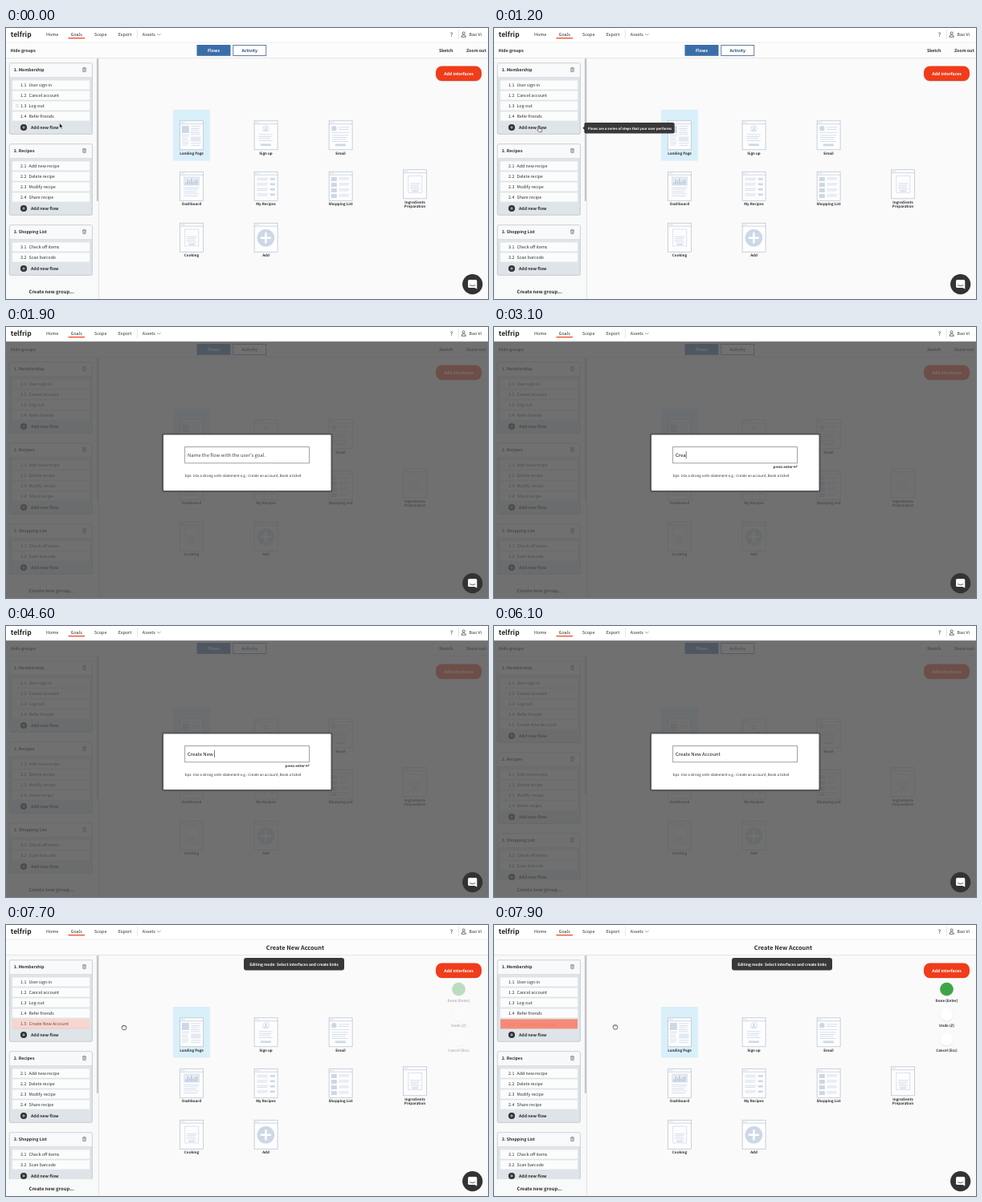
Write an HTML page that moves like this. It is 600 px wide and 338 px high and loops after 8000 ms.

```html
<!DOCTYPE html>
<html lang="en">
<head>
<meta charset="utf-8">
<title>Flow editor</title>
<style>
html, body { margin: 0; width: 100%; height: 100%; overflow: hidden; background: #fafafa; }
svg { display: block; width: 100vw; height: 100vh; }
text {
  font-family: "Noto Sans CJK JP", "Noto Sans CJK SC", "Noto Sans CJK", "Open Sans", sans-serif;
  white-space: pre; text-rendering: geometricPrecision;
}
</style>
</head>
<body>
<svg id="stage" viewBox="0 0 600 338"></svg>
<script>
const INK = '#2b2b2b', DARK = '#383838', RED = '#f03c1a', BLUE = '#cdd8e6';
const FONT_SCALE = .9; // the font's Latin letters are large for their nominal size

// Markup helpers
const rect = (x, y, w, h, fill, more = '') =>
  `<rect x="${x}" y="${y}" width="${w}" height="${h}" fill="${fill}" ${more}/>`;
const circle = (x, y, r, fill, more = '') =>
  `<circle cx="${x}" cy="${y}" r="${r}" fill="${fill}" ${more}/>`;
const path = (d, stroke, width = .7, fill = 'none') =>
  `<path d="${d}" fill="${fill}" stroke="${stroke}" stroke-width="${width}"/>`;
const text = (s, x, y, { size = 6, bold = 0, fill = INK, mid = 0, id = '' } = {}) =>
  `<text ${id && `id="${id}"`} x="${x}" y="${y}" fill="${fill}" text-anchor="${mid ? 'middle' : 'start'}"
    style="font-size:${size * FONT_SCALE}px;font-weight:${bold ? 600 : 400}">${s}</text>`;
const group = (id, ...parts) => `<g id="${id}">${parts.join('')}</g>`;
const at = (x, y, body) => `<g transform="translate(${x} ${y})">${body}</g>`;
const lines = (x, y, w, n, step = 2.5) =>
  Array.from({ length: n }, (_, i) => rect(x, y + i * step, w - (i % 3) * w * .08, .8, BLUE)).join('');

const trash = at(97.5, 0, path('M-2.4 -1.8H2.4M-.8 -1.8V-2.6H.8V-1.8M-1.8 -1.8L-1.6 2.6H1.6L1.8 -1.8M-.6 -.6V1.6M.6 -.6V1.6', '#555', .55));

function card(y, no, title, items) {
  const h = 36.5 + 13 * items.length, add = 28 + 13 * items.length;
  const rows = items.map((s, i) => {
    const c = 27.5 + 13 * i;
    return rect(8, c - 5.6, 96, 11.2, '#fbfcfc') +
      text(`${no}.${i + 1}`, 18, c + 2.1, { size: 5.9 }) + text(s, 28.5, c + 2.1, { size: 5.9 });
  }).join('');
  return at(0, y,
    rect(4.3, .3, 103, h, '#dfe4e8', 'rx="1.5" stroke="#b4bcc4" stroke-width=".7"') +
    rect(4.7, .7, 102.2, 17.3, '#f8f9fa', 'rx="1.2"') + rect(4.6, 17.8, 102.4, .5, '#ccd2d8') +
    text(`${no}. ${title}`, 9.7, 10.6, { size: 5.8, bold: 1 }) + at(0, 8.5, trash) + rows +
    circle(22, add + .5, 4.1, '#333') +
    path(`M20.2 ${add + .5}H23.8M22 ${add - 1.3}V${add + 2.3}`, '#dfe4e8', .7) +
    text('Add new flow', 31, add + 2.6, { size: 5.8, bold: 1 }));
}

function sidebar(id, extra) {
  const first = ['User sign in', 'Cancel account', 'Log-out', 'Refer friends', ...extra];
  const shift = 13 * extra.length;
  return group(id,
    card(43.5, 1, 'Membership', first),
    card(144.5 + shift, 2, 'Recipes', ['Add new recipe', 'Delete recipe', 'Modify recipe', 'Share recipe']),
    card(245.5 + shift, 3, 'Shopping List', ['Check off items', 'Scan barcode']),
    rect(112.8, 38, 2.2, extra.length ? 172 : 178, '#c3c6c9', 'rx="1"'));
}

// Thumbnail contents, in a 29 by 36 frame
const sheet = rect(6.5, 8, 17, 21, 'none', `stroke="${BLUE}" stroke-width=".7"`) +
  lines(9, 17, 12, 4, 2.2) + rect(11, 26, 8, 1.6, BLUE);
const art = {
  landing: rect(2.5, 6.5, 9, 9, BLUE) + lines(2.5, 17.5, 9, 6) + lines(14, 7, 12, 5) +
    rect(14, 20, 12, 6, '#e2e9f1') + lines(14, 28, 12, 2),
  signup: circle(14.7, 10, 3.8, '#fff', `stroke="${BLUE}" stroke-width=".8"`) + circle(14.7, 9.2, 1.4, BLUE) +
    rect(12.5, 11, 4.4, 1.6, BLUE) + lines(6, 17, 17, 4) + rect(8, 29, 13, 2.5, BLUE),
  email: circle(6.5, 9.8, 3.2, BLUE) + lines(12, 8, 14, 2) + path('M3 15H26', BLUE) +
    lines(4, 18, 20, 4) + rect(8, 29, 13, 2.8, BLUE),
  dashboard: rect(5.5, 7, 18.5, 10, '#e7edf4', `stroke="${BLUE}" stroke-width=".7"`) +
    [3, 7, 5, 8, 4, 6, 7].map((h, i) => rect(7 + i * 2.3, 16.5 - h, 1.4, h, '#b9c7d9')).join('') +
    lines(5, 20, 19, 5),
  recipes: [0, 1, 2, 3].map(i => lines(3.5, 8 + i * 6.5, 14, 2, 2) + rect(20, 8 + i * 6.5, 6, 2.6, BLUE)).join(''),
  shopping: [0, 1, 2, 3].map(i => rect(3, 7 + i * 7, 7, 5, BLUE) + lines(12.5, 7.5 + i * 7, 13, 2, 2)).join(''),
  sheet,
  add: circle(14.6, 18.8, 10.8, BLUE) + path('M8 18.8H21.2M14.6 12.2V25.4', '#fff', 2.4)
};

function thumb(cx, y, kind, ...label) {
  return at(cx - 14.7, y,
    rect(.3, .3, 29, 36, '#fdfdfe', 'stroke="#b3bfcd" stroke-width=".7"') +
    path('M.3 4.2H29.3', '#b3bfcd', .6) + [2, 3.8, 5.6].map(x => circle(x, 2.3, .5, '#a6b4c5')).join('') +
    art[kind] +
    label.map((s, i) => text(s, 14.7, 42.3 + 5.4 * i, { size: 5, bold: 1, mid: 1 })).join(''));
}

const hand = path('M-2 1V-2.6Q-1.4 -3.5 -.8 -2.6V-.6L2.2 0Q3 .4 2.8 1.4L2.2 3.6H-1.2L-3.2 1Q-3 .2 -2 1Z', '#222', .6, '#fff');
const fist = path('M-2.6 -.8Q-2.4 -2.4 -1 -2Q0 -2.8 1 -2Q2.6 -2.2 2.7 -.6V1.2L1.8 3H-1.4L-2.8 1.2Z', '#222', .7, '#fff') +
  path('M-.9 -1.6V-.2M.9 -1.6V-.2', '#222', .4);
const arrow = path('M-1.4 -3.2V2.8L0 1.5L1.1 3.9L2.1 3.4L1.1 1.2H2.9Z', '#fff', .5, '#111');

const roundButton = (y, fill, label) =>
  circle(563.5, y + .5, 8.6, '#e2e2e2') + circle(563.5, y, 8.3, fill) +
  text(label, 563.5, y + 15.6, { size: 5, bold: 1, mid: 1 });

const stage = document.getElementById('stage');
stage.innerHTML = [
  rect(0, 0, 600, 338, '#fafafa'),
  rect(0, 37, 115, 301, '#f8f9f9'),
  sidebar('listBefore', []),
  sidebar('listAfter', ['Create New Account']),
  group('grip', ...[0, 1, 2].map(i => rect(12.5, 95 + i * 1.6, 1, .8, '#bbb') + rect(14.3, 95 + i * 1.6, 1, .8, '#bbb'))),
  group('activeRow', rect(8, 117.4, 96, 12, '#f58a78'),
    text('1.5', 18, 125.6, { size: 5.9, fill: '#ee7c69' }), text('Create New Account', 28.5, 125.6, { size: 5.9, fill: '#ee7c69' })),
  rect(0, 317, 112.5, 21, '#f8f9f9'),
  text('Create new group...', 56.7, 331.2, { size: 6.5, bold: 1, mid: 1 }),
  rect(115, 37, .6, 301, '#d4d6d8'),
  rect(208, 102, 46, 63.5, '#d9eff9'),
  thumb(231, 115.5, 'landing', 'Landing Page'), thumb(323.5, 115.5, 'signup', 'Sign up'),
  thumb(416.5, 115.5, 'email', 'Email'), thumb(231, 179, 'dashboard', 'Dashboard'),
  thumb(323.5, 179, 'recipes', 'My Recipes'), thumb(416.5, 179, 'shopping', 'Shopping List'),
  thumb(509, 176.5, 'sheet', 'Ingredients', 'Preparation'),
  thumb(231, 243, 'sheet', 'Cooking'), thumb(323.5, 243, 'add', 'Add'),
  rect(535, 48.3, 57, 18.4, '#d9d9d9', 'rx="7.5"'),
  rect(535, 47.5, 57, 18.4, RED, 'rx="7.5"'),
  text('Add interfaces', 563.5, 58.9, { size: 5.8, bold: 1, fill: '#fff', mid: 1 }),
  rect(0, 18, 600, 19.5, '#fcfcfc'), rect(0, 37.3, 600, .6, '#d8d8d8'),
  group('toolbar',
    text('Hide groups', 5.8, 30.1, { size: 5.8, bold: 1 }),
    rect(237.5, 21, 42, 13.8, '#3b6ea8'),
    text('Flows', 258.5, 30, { size: 5.8, bold: 1, fill: '#fff', mid: 1 }),
    rect(282.8, 21.4, 41, 13, '#fff', 'stroke="#3c5f8a" stroke-width=".8"'),
    text('Activity', 303.2, 30, { size: 5.8, bold: 1, fill: '#2c4a70', mid: 1 }),
    text('Sketch', 539, 30.1, { size: 5.8, bold: 1 }), text('Zoom out', 573, 30.1, { size: 5.8, bold: 1 })),
  group('editBar',
    text('Create New Account', 360, 30.8, { size: 8.2, bold: 1, mid: 1 }),
    rect(296, 41, 125, 15.5, DARK, 'rx="3"'),
    text('Editing mode: Select interfaces and create links', 358.5, 50.7, { size: 5.3, bold: 1, fill: '#fff', mid: 1 })),
  group('actions', roundButton(80, '#3fa447', 'Done (Enter)'),
    roundButton(111.5, '#fff', 'Undo (Z)'), roundButton(142.5, '#fff', 'Cancel (Esc)')),
  group('modal',
    rect(0, 18, 600, 320, '#525252', 'opacity=".82"'),
    [2.4, 1.6, .8].map(d =>
      rect(196 - d, 134.5 - d, 208.5 + 2 * d, 69.5 + 2 * d, '#222', `rx="${d + 1}" opacity=".16"`)).join(''),
    rect(196, 134.5, 208.5, 69.5, '#fff', 'rx="1"'),
    rect(222.7, 149.6, 154.8, 20.2, '#fff', 'stroke="#8a8a8a" stroke-width=".8"'),
    text('', 226, 162, { size: 6.65, id: 'entry' }),
    rect(226, 155, .6, 9, '#222', 'id="caret"'),
    group('enterHint', text('press enter', 347.6, 175.9, { size: 4.9, bold: 1 }),
      path('M377 172.2V174.4H373M374.3 173.1L373 174.4L374.3 175.7', INK, .7)),
    text('tips: Use a strong verb-statement e.g.: Create an account, Book a ticket', 222.5, 187.2, { size: 4.95 })),
  group('tooltip', path('M110.3 124.8L113 122.6V127Z', 'none', 0, DARK),
    rect(112.4, 118, 112.3, 13.6, DARK, 'rx="2"'),
    text('Flows are a series of steps that your user performs', 117, 126.6, { size: 4.72, bold: 1, fill: '#fff' })),
  rect(0, 0, 600, 18, '#fff'), rect(0, 17.7, 600, .5, '#e0e0e0'),
  text('telfrip', 5.8, 10.9, { size: 9.4, bold: 1, fill: '#222' }),
  text('Home', 50, 10), text('Goals', 80.7, 10), text('Scope', 110, 10), text('Export', 139.8, 10), text('Assets', 169.8, 10),
  rect(77.5, 12, 20.5, 1.2, RED), rect(163, 2, .5, 12, '#d0d0d0'), rect(563, 2, .5, 12, '#ccc'),
  path('M188 6.8L190.3 9.2L192.6 6.8', '#666', .6),
  text('?', 552.8, 11, { size: 8 }),
  circle(569.7, 6.4, 1.5, 'none', 'stroke="#333" stroke-width=".7"'),
  path('M567 11.2Q567 8.6 569.7 8.6T572.4 11.2Z', '#333', .7),
  text('Bao Vi', 576.6, 10.2, { size: 5.9 }),
  circle(580.7, 319.6, 12.6, '#333'),
  path('M576.6 314H584.8Q586.3 314 586.3 315.5V325.6L583.4 323.9H576.6Q575.1 323.9 575.1 322.4V315.5Q575.1 314 576.6 314Z', 'none', 0, '#fff'),
  path('M577.2 320.6Q580.7 323 584.2 320.6', '#333', .8),
  group('cursor', group('arrow', arrow), group('hand', hand), group('fist', fist))
].join('');

const $ = id => document.getElementById(id);
const show = (id, on) => $(id).setAttribute('opacity', Number(on));
const ramp = (t, a, b) => Math.min(1, Math.max(0, (t - a) / (b - a)));

const LOOP = 8000, GOAL = 'Create New Account', HINT = 'Name the flow with the user\'s goal.';
// One key press per letter, in tenths of a second
const keyTimes = [23, 27, 29, 31, 34, 35, 37, 39, 42, 43, 46, 48, 50, 52, 53, 54, 55, 56];
// time, x, y
const trail = [[100, 68, 122], [500, 57, 126], [1200, 57, 126], [1300, 86, 125], [1500, 130, 124],
  [6500, 177, 88], [6900, 177, 96], [7200, 170, 104], [7600, 145, 128], [7900, 151, 127]];

function pointer(t) {
  const i = trail.findIndex(k => k[0] >= t);
  if (i < 1) return trail.at(i).slice(1);
  const [a, b] = [trail[i - 1], trail[i]], p = ramp(t, a[0], b[0]);
  return [1, 2].map(n => a[n] + (b[n] - a[n]) * p);
}

function draw(t) {
  const open = t >= 1300 && t < 7700, added = t >= 6100, editing = t >= 7700;
  const reveal = editing ? ramp(t, 7600, 7900) : 0;
  show('listBefore', !added);
  show('listAfter', added);
  show('grip', t < 500);
  show('toolbar', !editing);
  show('editBar', editing);
  show('activeRow', reveal);
  show('actions', reveal);
  show('modal', open);
  show('tooltip', Math.min(ramp(t, 900, 1100), 1 - ramp(t, 1300, 1500)));

  const typed = GOAL.slice(0, keyTimes.filter(k => k * 100 <= t).length);
  const entry = $('entry');
  entry.textContent = typed || HINT;
  entry.setAttribute('fill', typed ? '#111' : '#444');
  $('caret').setAttribute('x', 226.2 + (typed ? entry.getComputedTextLength() : 0));
  show('caret', t < 1700 || (typed && !added));
  show('enterHint', typed && !added);

  const [x, y] = pointer(t);
  $('cursor').setAttribute('transform', `translate(${x} ${y})`);
  show('cursor', t < 1500 || t >= 6500);
  show('arrow', t < 500 || (t >= 1300 && t < 6500));
  show('hand', t >= 500 && t < 1300);
  show('fist', t >= 6500);
}

const start = performance.now();
function tick() {
  draw(Math.floor((performance.now() - start) % LOOP / 100) * 100);
  requestAnimationFrame(tick);
}
tick();
</script>
</body>
</html>
```
